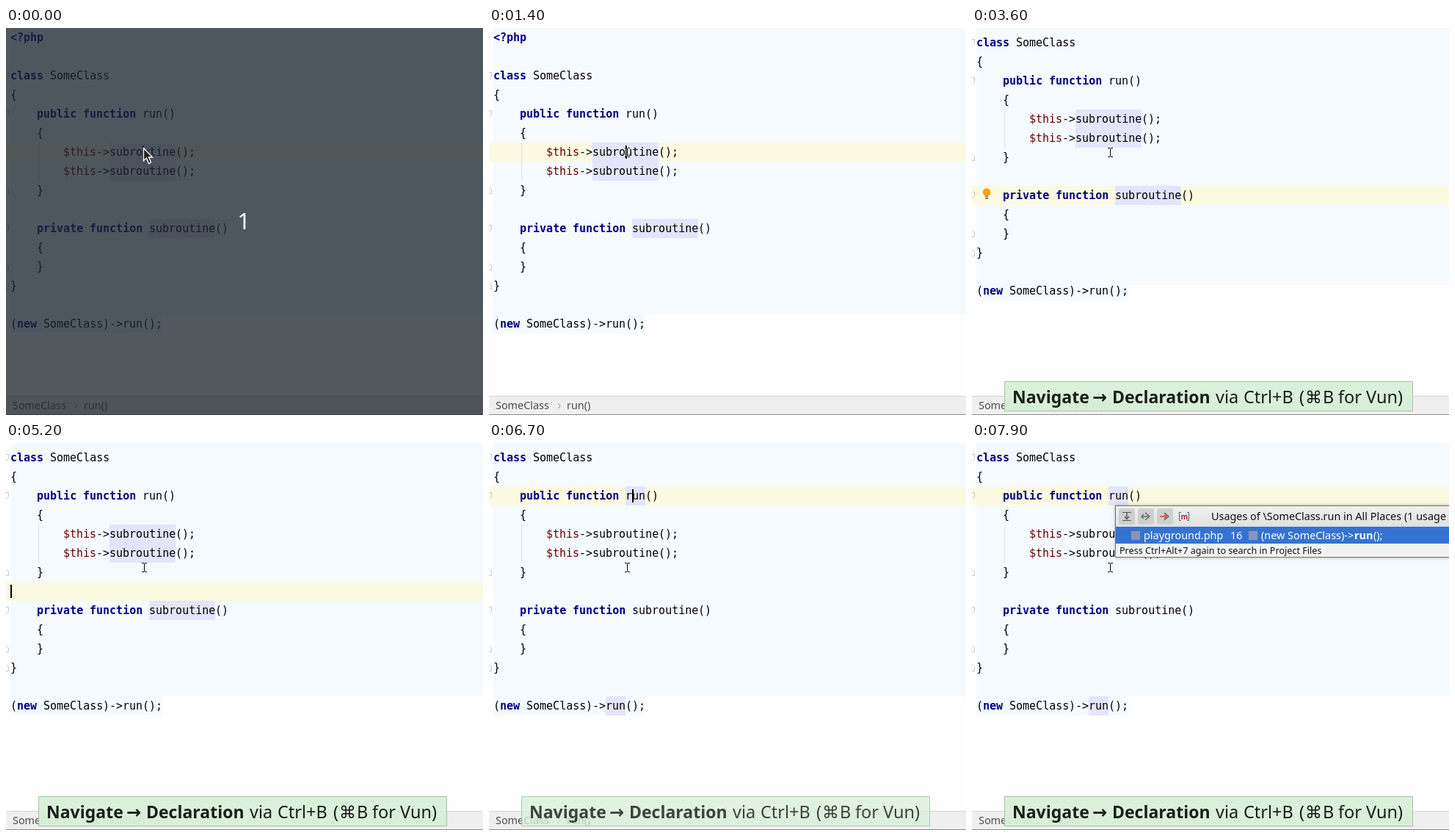
Recreate the animation shown at these times as an HTML page with a canvas. Size 650 by 527 pixels, loop 8000 ms.

```html
<!DOCTYPE html>
<html lang="en">
<head>
<meta charset="utf-8">
<title>Code navigation</title>
<style>
  html, body { margin: 0; width: 100%; height: 100%; overflow: hidden; background: #fff; }
  canvas { display: block; width: 650px; height: 527px; }
</style>
</head>
<body>
<canvas id="stage" width="650" height="527"></canvas>
<script>
const ctx = document.getElementById('stage').getContext('2d');
const LOOP = 8000, W = 650, H = 527;
const ROW = 26, COL = 9, LEFT = 6;
const MONO = '15px "DejaVu Sans Mono", monospace';
const SANS = '"Noto Sans", "Open Sans", "DejaVu Sans", sans-serif';

const LINES = [
  '<?php',
  '',
  'class SomeClass',
  '{',
  '    public function run()',
  '    {',
  '        $this->subroutine();',
  '        $this->subroutine();',
  '    }',
  '',
  '    private function subroutine()',
  '    {',
  '    }',
  '}',
  '',
  '(new SomeClass)->run();'
];
const KEYWORD = /^(<\?php|class|public|private|function|new)$/;

// Each track lists [start time, value] and holds the value until the next entry.
const TRACKS = {
  scroll: [[0, 0], [2600, 22], [2700, 40], [2800, 45]],
  row: [[0, 6], [700, 5], [1100, 6], [2600, 10], [5100, 9], [5500, 8],
        [5800, 7], [5900, 6], [6100, 5], [6400, 4]],
  col: [[0, 20], [2600, 21]],
  caret: [[0, true], [3600, false], [4100, true], [4900, false], [5100, true], [7700, false]],
  word: [[0, 'subroutine'], [1100, ''], [1400, 'subroutine'], [5500, ''],
         [5800, 'subroutine'], [6400, ''], [6700, 'run']],
  braces: [[0, false], [900, true], [1100, false], [5600, true], [5800, false],
           [6200, true], [6400, false]],
  bulb: [[0, false], [2100, true], [2600, false], [3600, true], [5100, false],
         [7100, true], [7300, false]],
  pointer: [[0, 'arrow'], [100, 'beam'], [500, 'drag'], [700, 'beam'], [2000, 'drag'], [2100, 'beam']],
  crumb: [[0, 'run()'], [2700, 'subroutine()'], [5300, ''], [6000, 'run()']],
  toast: [[0, 0], [2600, 0.3], [2700, 0.7], [2800, 0.95], [6700, 0.78], [6800, 0],
          [7300, 0.5], [7400, 0.95]],
  popup: [[0, 0], [7700, 1], [7900, 2]],
  dim: [[0, true], [100, false]]
};

function stateAt(t) {
  const state = {};
  for (const key in TRACKS) {
    for (const [start, value] of TRACKS[key]) if (t >= start) state[key] = value;
  }
  return state;
}

function rect(x, y, w, h, color) {
  ctx.fillStyle = color;
  ctx.fillRect(x, y, w, h);
}

function frame(x, y, w, h, color) {
  ctx.strokeStyle = color;
  ctx.lineWidth = 1;
  ctx.strokeRect(x + 0.5, y + 0.5, w - 1, h - 1);
}

function text(str, x, y, font, color) {
  ctx.font = font;
  ctx.fillStyle = color;
  ctx.fillText(str, x, y);
}

function sans(str, x, y, size, color, weight = '') {
  text(str, x, y, `${weight} ${size}px ${SANS}`, color);
}

function path(points, stroke, fill, width = 1) {
  ctx.beginPath();
  points.forEach(([x, y], i) => i ? ctx.lineTo(x, y) : ctx.moveTo(x, y));
  if (fill) {
    ctx.closePath();
    ctx.fillStyle = fill;
    ctx.fill();
  }
  ctx.strokeStyle = stroke;
  ctx.lineWidth = width;
  ctx.stroke();
}

const colX = col => LEFT + col * COL;

function drawLine(line, top) {
  for (const { 0: token, index } of line.matchAll(/<\?php|\$\w+|\w+|[^\s\w$]+/g)) {
    const bold = KEYWORD.test(token);
    const color = bold ? '#000080' : token[0] === '$' ? '#660000' : '#000';
    text(token, colX(index), top + 18, (bold ? 'bold ' : '') + MONO, color);
  }
}

function drawFold(row, dir) {
  const y = row * ROW + 13;
  path([[-1, y - 4.5 * dir], [3.5, y - 4.5 * dir], [3.5, y + 1 * dir], [0, y + 4.5 * dir]], '#c6c8ca');
}

function drawBulb(top) {
  ctx.fillStyle = '#f3a30c';
  ctx.beginPath();
  ctx.arc(20, top + 8.5, 5.3, 0, Math.PI * 2);
  ctx.fill();
  rect(17.5, top + 11, 5, 3, '#f3a30c');
  rect(17.5, top + 14, 5, 1, '#777');
  rect(18, top + 16, 4, 1.5, '#555');
}

function drawEditor(s) {
  ctx.save();
  ctx.beginPath();
  ctx.rect(0, 0, W, 501);
  ctx.clip();
  ctx.translate(0, -s.scroll);

  rect(LEFT, 0, W, 15 * ROW, '#f5faff');
  rect(LEFT, 15 * ROW, 207, ROW, '#f5faff');
  const top = s.row * ROW;
  rect(0, top, W, ROW, '#fcf9e1');

  LINES.forEach((line, i) => {
    if (!s.word) return;
    for (const m of line.matchAll(new RegExp(`\\b${s.word}\\b`, 'g'))) {
      rect(colX(m.index), i * ROW, s.word.length * COL, ROW, '#e4e4fd');
    }
  });
  if (s.braces) for (const row of [5, 8]) rect(colX(4), row * ROW, COL, ROW, '#99ccff');

  rect(44, 6 * ROW, 1, 2 * ROW, '#dde1e5');
  for (const row of [2, 4, 10]) drawFold(row, 1);
  for (const row of [8, 12, 13]) drawFold(row, -1);
  LINES.forEach((line, i) => drawLine(line, i * ROW));

  if (s.bulb) drawBulb(top);
  if (s.caret) rect(colX(Math.min(s.col, LINES[s.row].length)), top + 4, 2, 18, '#000');
  ctx.restore();
}

function drawStatus(crumb) {
  rect(0, 501, W, 26, '#f0eff0');
  rect(0, 501, W, 1, '#d4d3d4');
  rect(0, 526, W, 1, '#8b8b8b');
  sans('SomeClass', 9, 519, 14.4, '#4c4c4c');
  if (!crumb) return;
  path([[94, 511], [97, 514.5], [94, 518]], '#8a8a8a');
  sans(crumb, 106, 519, 14.4, '#4c4c4c');
}

function drawToast(alpha) {
  if (!alpha) return;
  ctx.save();
  ctx.globalAlpha = alpha;
  rect(44, 481, 557, 41, '#d8f0d9');
  frame(44, 481, 557, 41, '#a5bfa5');
  const ink = '#111';
  sans('Navigate', 55, 511, 23, ink, 'bold');
  text('→', 164, 511, 'bold 24px "DejaVu Sans", sans-serif', ink);
  sans('Declaration', 191, 511, 23, ink, 'bold');
  sans('via', 332, 511, 23.5, ink);
  sans('Ctrl+B', 370, 511, 23.5, ink);
  sans('(', 446, 511, 23.5, ink);
  text('⌘', 454, 511, '23px "DejaVu Sans", sans-serif', ink);
  sans('B', 478, 511, 23.5, ink);
  sans('for Vun)', 499, 511, 23.5, ink);
  ctx.restore();
}

function drawToolbar() {
  for (const x of [200, 226, 252]) {
    ctx.fillStyle = '#cfcfcf';
    ctx.beginPath();
    ctx.roundRect(x, 89, 22, 22, 3);
    ctx.fill();
  }
  const gray = '#5c5c5c', green = '#4c8a4c', red = '#c8553d';
  path([[205, 94.5], [217, 94.5]], gray);
  path([[211, 95], [211, 103]], gray, null, 1.5);
  path([[208, 100], [211, 103.5], [214, 100]], gray, null, 1.5);
  path([[205, 105.5], [217, 105.5]], gray);
  path([[236, 95], [242, 100], [236, 105]], gray, null, 1.2);
  path([[240, 100], [231, 100]], green, null, 1.6);
  path([[234, 97], [231, 100], [234, 103]], green, null, 1.6);
  path([[262, 95], [268, 100], [262, 105]], gray, null, 1.2);
  path([[256, 100], [265, 100]], red, null, 1.6);
  path([[262, 97], [265, 100], [262, 103]], red, null, 1.6);
  path([[285, 94.5], [282.5, 94.5], [282.5, 105.5], [285, 105.5]], gray);
  path([[293, 94.5], [295.5, 94.5], [295.5, 105.5], [293, 105.5]], gray);
  sans('m', 284.5, 103.5, 10, '#b3243c', 'bold');
}

function drawPopup(stage) {
  if (!stage) return;
  ctx.save();
  ctx.shadowColor = 'rgba(0,0,0,.35)';
  ctx.shadowBlur = 4;
  rect(195, 85, 460, 71, '#f2f2f2');
  ctx.restore();

  const header = ctx.createLinearGradient(0, 86, 0, 114);
  header.addColorStop(0, '#f0f0f0');
  header.addColorStop(1, '#e0e0e0');
  rect(196, 86, 460, 28, header);
  drawToolbar();
  sans('Usages of \\SomeClass.run in All Places (1 usage', 326, 105, 14.4, '#111');

  rect(196, 114, 460, 23, stage > 1 ? '#3573d2' : '#fff');
  if (stage > 1) {
    for (const x of [217, 377]) rect(x, 120, 12, 12, '#8795bd');
    sans('playground.php', 234, 131, 14.4, '#fff');
    sans('16', 352, 131, 14.4, '#fff');
    sans('(new SomeClass)->', 394, 131, 14.4, '#fff');
    sans('run', 521, 131, 14.4, '#fff', 'bold');
    sans('();', 547, 131, 14.4, '#fff');
  }
  rect(196, 137, 460, 18, '#f2f2f2');
  sans('Press Ctrl+Alt+7 again to search in Project Files', 201, 151, 12.6, '#111');
  frame(195, 85, 460, 71, '#777');
}

function drawArrow() {
  path([[187.5, 163.5], [187.5, 180.5], [191.5, 177], [194.5, 184.5], [197.5, 183],
        [194.5, 176], [199.5, 176], [187.5, 163.5]], '#fff', '#222', 1.3);
}

function drawPointer(kind) {
  if (kind === 'beam') {
    rect(187, 163, 3, 13, 'rgba(255,255,255,.7)');
    rect(188, 164, 1, 11, '#000');
    for (const y of [163, 175]) {
      rect(185, y, 3, 1, '#000');
      rect(189, y, 3, 1, '#000');
    }
    return;
  }
  if (kind === 'drag') {
    rect(197, 185, 14, 15, '#fff');
    frame(197, 185, 14, 15, '#333');
  }
  drawArrow();
}

function draw(t) {
  const s = stateAt(t);
  rect(0, 0, W, H, '#fffeff');
  drawEditor(s);
  drawStatus(s.crumb);
  drawToast(s.toast);
  drawPopup(s.popup);
  if (s.dim) rect(0, 0, W, H, 'rgba(30,38,46,.77)');
  drawPointer(s.pointer);
  if (s.dim) {
    ctx.textAlign = 'center';
    sans('1', 324, 274, 31, '#fff');
    ctx.textAlign = 'left';
  }
}

const begin = performance.now();
function tick() {
  draw((performance.now() - begin) % LOOP);
  requestAnimationFrame(tick);
}
tick();
</script>
</body>
</html>
```
